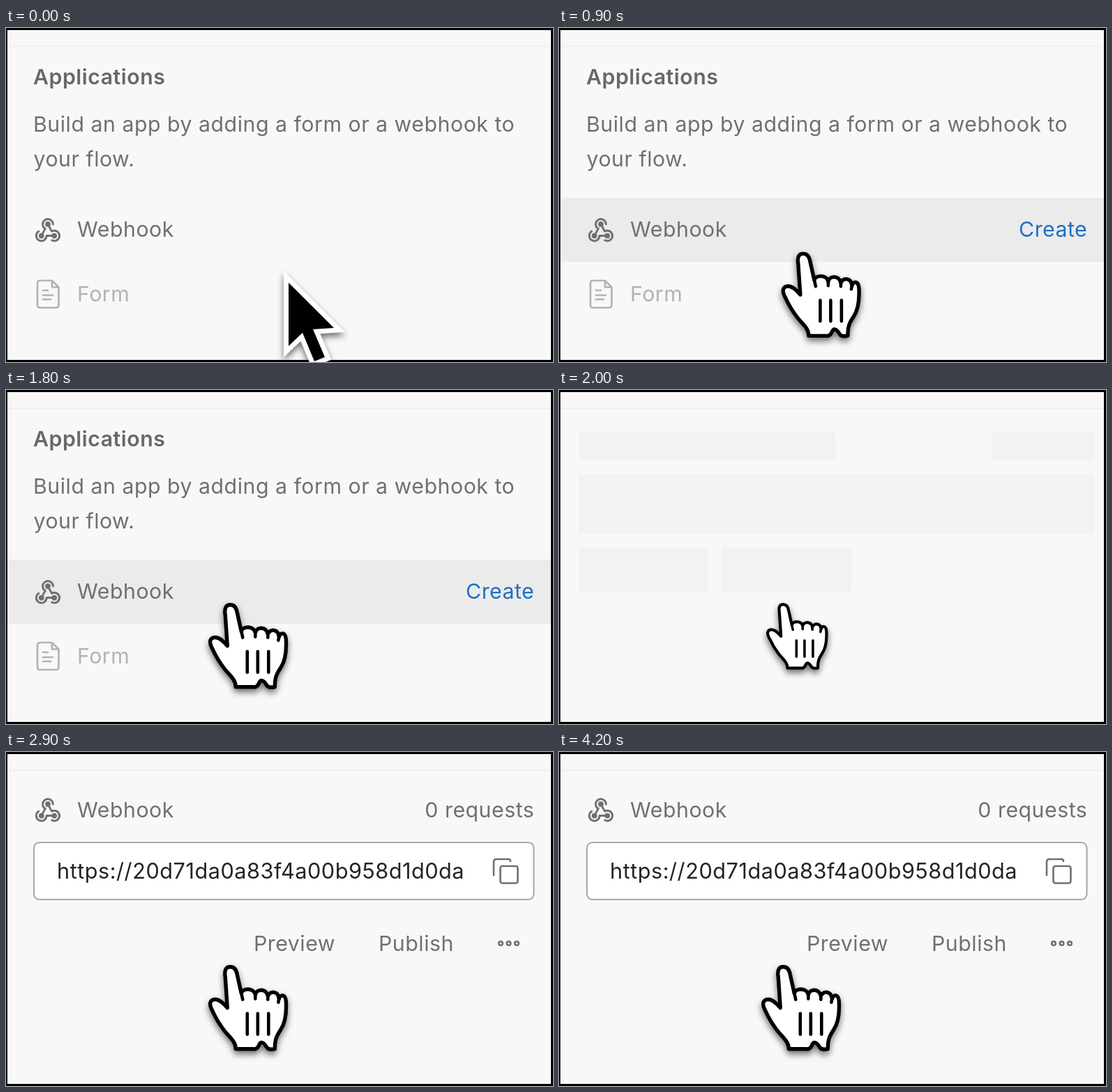
Animation of 784x480 px, one loop 4.3 s. Source, as an HTML page:

```html
<!DOCTYPE html>
<html lang="en">
<head>
<meta charset="utf-8">
<title>Webhook</title>
<style>
  html, body { margin: 0; width: 100%; height: 100%; overflow: hidden; background: #000; }
  svg { display: block; width: 784px; height: 480px; }
  text {
    font: 400 30.3px Inter, "Liberation Sans", sans-serif;
    font-optical-sizing: none;
    letter-spacing: .5px;
    fill: #707070;
  }
  .bold { font-weight: 600; fill: #686868; }
  .dim { fill: #b3b3b3; }
  .link { fill: #1f70c4; }
  .url { font-size: 30.7px; fill: #242424; }
  .end { text-anchor: end; }
  .icon { fill: none; stroke: #707070; stroke-linecap: round; stroke-linejoin: round; }
  .row { fill: #ebebeb; }
  .bone { fill: #f2f2f2; }
  .cursor { filter: drop-shadow(0 5px 5px rgba(0, 0, 0, .55)); }
</style>
</head>
<body>
<svg viewBox="0 0 784 480">
  <defs>
    <g id="hook" class="icon" stroke-width="1.6" transform="scale(1.85) translate(-12 -12.9)">
      <path d="M4.876 13.61a4 4 0 1 0 6.124 3.39h6"/>
      <path d="M15.066 20.502a4 4 0 1 0 1.934 -7.502c-.706 0 -1.424 .179 -2 .5l-3 -5.5"/>
      <path d="M16 8a4 4 0 1 0 -8 0c0 1.506 .77 2.818 2 3.5l-3 5.5"/>
      <circle cx="12" cy="8" r="1.3"/>
      <circle cx="7" cy="17" r="1.3"/>
      <circle cx="17" cy="17" r="1.3"/>
    </g>
  </defs>

  <rect x="2" y="3" width="779" height="474" fill="#f8f8f8"/>
  <rect x="2" y="25.5" width="779" height="2" fill="#efefef"/>

  <g id="menu">
    <rect id="hookRow" class="row" x="2" y="244" width="779" height="92"/>
    <rect id="formRow" class="row" x="2" y="336" width="779" height="92"/>
    <text class="bold" x="39" y="80.5">Applications</text>
    <text x="39" y="148.5">Build an app by adding a form or a webhook to</text>
    <text x="39.5" y="198.5">your flow.</text>
    <use href="#hook" x="60" y="291"/>
    <text x="102" y="300">Webhook</text>
    <text id="create" class="link end" x="757.3" y="300">Create</text>
    <g class="icon" stroke-width="2.7" style="stroke:#b3b3b3">
      <path d="M66 363H49q-4 0-4 4v31q0 4 4 4h22.5q4 0 4-4V372.5zV372.5H75.5M53 377h7M53 384h14M53 390h11"/>
    </g>
    <text class="dim" x="102" y="393">Form</text>
  </g>

  <g id="bones" class="bone">
    <rect x="28" y="60" width="368" height="41" rx="4"/>
    <rect x="620" y="60" width="148" height="41" rx="4"/>
    <rect x="28" y="122" width="740" height="84" rx="4"/>
    <rect x="28" y="226" width="186" height="64" rx="4"/>
    <rect x="233" y="226" width="186" height="64" rx="4"/>
  </g>

  <g id="result">
    <use href="#hook" x="60" y="84"/>
    <text x="102" y="93.5">Webhook</text>
    <text class="end" x="757.3" y="93.5">0 requests</text>
    <rect x="40" y="130" width="716.5" height="82" rx="8" fill="#fff" stroke="#ababab" stroke-width="2.2"/>
    <text class="url" x="73" y="181.5">https://20d71da0a83f4a00b958d1d0da</text>
    <g class="icon" stroke-width="2.6">
      <rect x="708.5" y="164" width="25" height="24.5" rx="3"/>
      <path d="M699 177V158q0-4 4-4H720q3 0 3 3"/>
      <circle cx="709" cy="275" r="2.8"/>
      <circle cx="720.5" cy="275" r="2.8"/>
      <circle cx="732" cy="275" r="2.8"/>
    </g>
    <text x="355" y="285.5">Preview</text>
    <text x="534" y="285.5">Publish</text>
  </g>

  <g id="arrow" class="cursor">
    <path d="M405 366V457L425 438L442 479L457 473L440 433L470 431Z"
      fill="#000" stroke="#fff" stroke-width="14" paint-order="stroke"/>
  </g>

  <g class="cursor">
    <g id="hand" fill="none" stroke="#000" stroke-width="5.4" stroke-linecap="round" stroke-linejoin="round">
      <path fill="#fff" d="M8 121C8 110-1 104-8 95C-15 86-20 78-25 67C-31 56-29 52-24 50
        C-16 48-9 56-4 62L-7 18C-9 6-5 3 0 3C6 3 9 8 10 14L16 41C18 33 34 33 36 43
        C38 34 52 34 54 45C57 37 69 37 70 49C72 42 79 42 80 52C81 70 79 84 72 94
        C66 103 64 108 64 121C58 122 54 122 52 118C48 111 44 110 42 114C40 119 38 122 34 121Z"/>
      <path stroke-width="4.6" d="M16 41l2 9M36 43v6M54 45v5M70 49l-1 5"/>
      <path stroke-width="4.6" d="M24.5 70v30M39.5 70v30M55 70v30"/>
    </g>
  </g>
</svg>

<script>
const LOOP = 4300, STEP = 100;
const el = id => document.getElementById(id);
const show = (id, on) => { el(id).style.display = on ? "" : "none"; };
const ramp = (t, a, b) => Math.min(1, Math.max(0, (t - a) / (b - a)));
const ease = p => p * p * (3 - 2 * p);
const mix = (a, b, p) => a + (b - a) * p;

function render(t) {
  show("menu", t < 1900);
  show("bones", t >= 1900 && t < 2200);
  show("result", t >= 2200);
  show("create", t >= 700);
  show("arrow", t < 500);
  show("hand", t >= 500);

  el("formRow").style.opacity = t < 500 ? 0 : 1 - ramp(t, 700, 850);
  el("hookRow").style.opacity = ramp(t, 690, 850);

  // The pointer glides to the upper row, then shrinks about its tip for the click.
  const move = ease(ramp(t, 660, 1060));
  const press = ease(ramp(t, 1800, 2000)) - ease(ramp(t, 2000, 2200));
  const x = mix(402.5, 321.3, move), y = mix(350, 305.8, move);
  el("hand").setAttribute("transform", `translate(${x} ${y}) scale(${1 - 0.225 * press})`);
}

const start = performance.now();
function tick() {
  const t = (performance.now() - start) % LOOP;
  render(Math.floor(t / STEP) * STEP);
  requestAnimationFrame(tick);
}
render(0);
tick();
</script>
</body>
</html>
```
